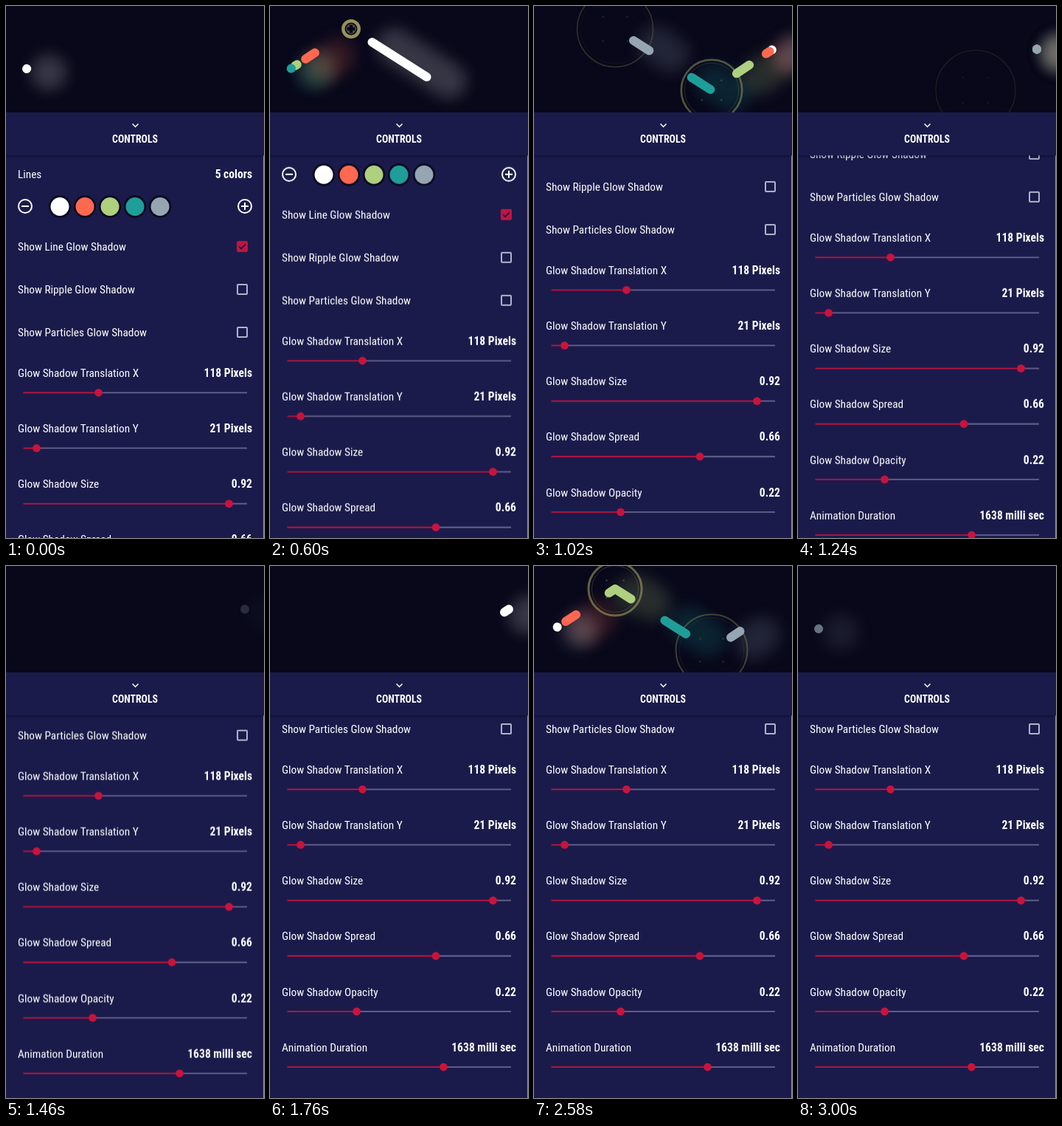
An HTML page with a canvas for the animation above (3.02 s loop, 350 px wide and 720 px high).

```html
<!DOCTYPE html>
<html lang="en">
<head>
<meta charset="utf-8">
<title>Line loader controls</title>
<style>
html, body { margin: 0; width: 100%; height: 100%; overflow: hidden; background: #08081a; }
#stage { position: absolute; left: 0; top: 0; width: 350px; height: 720px; overflow: hidden;
  font: 400 15.3px "Roboto Condensed", Roboto, sans-serif; font-stretch: 75%; color: #fff; }
canvas { position: absolute; left: 0; top: 0; }
#panel { position: absolute; left: 0; top: 144px; width: 350px; height: 576px; background: #1b1b4b; overflow: hidden; }
#edge { position: absolute; right: 0; top: 58px; width: 1px; height: 518px; background: #8f8fae; }
#head { position: absolute; left: 0; top: 0; width: 350px; height: 58px; background: #1b1b4b;
  box-shadow: 0 1px 4px rgba(4, 4, 25, .6); text-align: center; font-size: 13.8px; font-weight: 700; }
#head span { position: absolute; left: 0; width: 350px; top: 26px; line-height: 20px; }
#head svg { position: absolute; left: 170px; top: 13px; }
#list { position: absolute; left: 0; top: -144px; width: 350px; height: 940px; will-change: transform; }
#list > * { position: absolute; }
#list svg { display: block; }
.label { left: 16px; line-height: 20px; white-space: nowrap; }
.value { right: 16px; line-height: 20px; white-space: nowrap; font-size: 15.6px; font-weight: 700; }
.box { left: 313px; width: 15px; height: 15px; box-sizing: border-box; border: 2px solid #b3b2cd; border-radius: 2px; }
.box.on { border: 0; background: #c2143f; }
</style>
</head>
<body>
<div id="stage">
  <canvas id="view" width="350" height="144"></canvas>
  <div id="panel">
    <div id="list"></div>
    <div id="edge"></div>
    <div id="head">
      <svg width="11" height="9"><path d="M1.5 2.5L5.5 6.5L9.5 2.5" fill="none" stroke="#fff" stroke-width="1.5"/></svg>
      <span>CONTROLS</span>
    </div>
  </div>
</div>
<script>
const LOOP = 3020, TURN = 1615;
const COLORS = ['#ffffff', '#ff6850', '#aed07f', '#1f9e99', '#95a5b2'];
const list = document.getElementById('list');

// ---- control list ----
function add(cls, css, html = '') {
  const el = document.createElement('div');
  el.className = cls;
  el.style.cssText = css;
  el.innerHTML = html;
  list.appendChild(el);
}
const label = (y, text) => add('label', `top:${y - 10}px`, text);
const value = (y, text) => add('value', `top:${y - 10}px`, text);

function roundButton(x, y, d) {
  add('', `left:${x - 11}px;top:${y - 11}px`,
    `<svg width="22" height="22"><g fill="none" stroke="#fff" stroke-width="2">
     <circle cx="11" cy="11" r="9"/><path d="${d}"/></g></svg>`);
}
function swatch(x, y, color) {
  add('', `left:${x - 16}px;top:${y - 16}px`,
    `<svg width="32" height="33"><circle cx="16" cy="16.5" r="15.2" fill="#0a0a22"/>
     <circle cx="16" cy="16.5" r="12.5" fill="${color}"/></svg>`);
}
function checkRow(y, text, on) {
  label(y, text);
  add(on ? 'box on' : 'box', `top:${y - 8}px`, on
    ? '<svg width="15" height="15"><path d="M3 7.5L6 10.5L12 4.5" fill="none" stroke="#1b1b4b" stroke-width="1.8"/></svg>' : '');
}
function sliderRow(y, text, val, x) {
  const row = Math.round(y), cy = y - row + 8.3;
  label(row, text);
  value(row, val);
  add('', `left:0;top:${row + 18}px`,
    `<svg width="350" height="18"><g stroke-width="1.8">
     <path d="M${x} ${cy}H327" stroke="#68658f"/><path d="M23.5 ${cy}H${x}" stroke="#c2143f"/></g>
     <circle cx="${x}" cy="${cy}" r="5.4" fill="#c8143c"/></svg>`);
}

label(228, 'Lines');
value(228, '5 colors');
roundButton(26, 271, 'M6 11H16');
roundButton(324, 271, 'M6 11H16M11 6V16');
COLORS.forEach((c, i) => swatch(73 + 34 * i, 271, c));
checkRow(326, 'Show Line Glow Shadow', true);
checkRow(384, 'Show Ripple Glow Shadow', false);
checkRow(442, 'Show Particles Glow Shadow', false);
[
  ['Glow Shadow Translation X', '118 Pixels', 125.5],
  ['Glow Shadow Translation Y', '21 Pixels', 41.5],
  ['Glow Shadow Size', '0.92', 302.5],
  ['Glow Shadow Spread', '0.66', 225],
  ['Glow Shadow Opacity', '0.22', 117.5],
  ['Animation Duration', '1638 milli sec', 235.5]
].forEach(([text, val, x], i) => sliderRow(497 + 75.15 * i, text, val, x));

// time, offset, speed
const SCROLL = [[190, 0, 0], [600, 43, .21], [800, 89, .23], [1240, 183, .18], [1660, 221, 0]];
function scrollAt(t) {
  if (t <= SCROLL[0][0]) return 0;
  for (let i = 1; i < SCROLL.length; i++) {
    const [t0, y0, v0] = SCROLL[i - 1], [t1, y1, v1] = SCROLL[i];
    if (t > t1) continue;
    const d = t1 - t0, u = (t - t0) / d, w = 1 - u;
    return w * w * (1 + 2 * u) * y0 + u * u * (3 - 2 * u) * y1 + d * u * w * (w * v0 - u * v1);
  }
  return 221;
}

// ---- line animation ----
const ctx = document.getElementById('view').getContext('2d');
const PATH = [[28, 85], [110, 31], [241, 114], [324, 58.5]];
const clamp = x => Math.max(0, Math.min(1, x));

// each end of a line: start, finish, steepness, lag
const LINES = [
  { show: 0, head: [-50, 1130, 2.4, 0], tail: [150, 1140, 2.9, 0] },
  { show: 200, head: [0, 1160, 3.26, 2.31], tail: [0, 1160, 3.15, 2.84] },
  { show: 340, head: [0, 1220, 3.36, 3.39], tail: [0, 1220, 3.3, 3.79] },
  { show: 480, head: [430, 1245, 2.9, 1.91], tail: [430, 1245, 2.9, 2.3] },
  { show: 660, head: [660, 1245, 3, 1.7], tail: [660, 1245, 3, 2] }
];

function ease(t, [start, end, power, lag]) {
  const p = clamp((t - start) / (end - start));
  const a = p ** power, b = Math.exp(lag) * (1 - p) ** power;
  return a / (a + b);
}

function tracePart(pts, from, to) {
  const lens = pts.slice(1).map((p, i) => Math.hypot(p[0] - pts[i][0], p[1] - pts[i][1]));
  const total = lens.reduce((a, b) => a + b);
  // a resting line keeps a tiny length so its round cap shows
  const a = Math.min(from * total, total - .05), b = Math.max(to * total, a + .05);
  let pos = 0, begun = false;
  ctx.beginPath();
  lens.forEach((len, i) => {
    const [x, y] = pts[i], [x2, y2] = pts[i + 1];
    const at = d => [x + (x2 - x) * d / len, y + (y2 - y) * d / len];
    const s = Math.max(0, a - pos), e = Math.min(len, b - pos);
    if (s < e) {
      if (!begun) ctx.moveTo(...at(s));
      begun = true;
      ctx.lineTo(...at(e));
    }
    pos += len;
  });
}

function circle(x, y, r) {
  ctx.beginPath();
  ctx.arc(x, y, r, 0, 7);
}

function ripple([x, y], age) {
  if (age <= 0 || age >= 680) return;
  const r = 55 * Math.sin(Math.PI / 2 * Math.min(1, age / 650));
  const left = 1 - age / 680;
  ctx.globalAlpha = left;
  ctx.strokeStyle = '#a9a562';
  ctx.lineWidth = .4 + 4.6 * left;
  circle(x, y, r);
  ctx.stroke();
  ctx.lineWidth = 1;
  ctx.globalAlpha = left * left * .8;
  circle(x, y, Math.max(1, r - 4.5));
  ctx.stroke();
  // four sparks drifting outwards
  ctx.globalAlpha = left * .7;
  ctx.fillStyle = '#8b8878';
  for (const sx of [-1, 1]) for (const sy of [-1, 1]) {
    circle(x + sx * r * .32, y + sy * r * .32, 1.3);
    ctx.fill();
  }
}

function drawLines(t, pts) {
  const parts = LINES.map((l, i) => ({
    color: COLORS[i],
    head: ease(t, l.head),
    tail: ease(t, l.tail),
    alpha: t < l.show ? 0 : 1 - clamp(i < 4 ? (t - 1220) / 140 : (t - 1330) / 170)
  })).filter(p => p.alpha > 0);
  const stroke = (p, width, alpha) => {
    ctx.globalAlpha = alpha * p.alpha;
    ctx.strokeStyle = p.color;
    ctx.lineWidth = width;
    tracePart(pts, Math.min(p.head, p.tail), p.head);
    ctx.stroke();
  };
  ctx.save();
  ctx.translate(30, 5);
  ctx.filter = 'blur(10px)';
  [...parts].reverse().forEach(p => stroke(p, 48, .19));
  ctx.restore();
  ripple(pts[1], t - 520);
  ripple(pts[2], t - 670);
  parts.forEach(p => stroke(p, 12, 1));
}

function render(time) {
  const t = time % LOOP;
  list.style.transform = `translateY(${-scrollAt(t)}px)`;
  ctx.globalAlpha = 1;
  ctx.fillStyle = '#08081a';
  ctx.fillRect(0, 0, 350, 144);
  ctx.lineCap = ctx.lineJoin = 'round';
  const back = t >= TURN;
  drawLines(back ? t - TURN : t, back ? [...PATH].reverse() : PATH);
}

const begin = performance.now();
function tick() {
  render(performance.now() - begin);
  requestAnimationFrame(tick);
}
tick();
</script>
</body>
</html>
```
